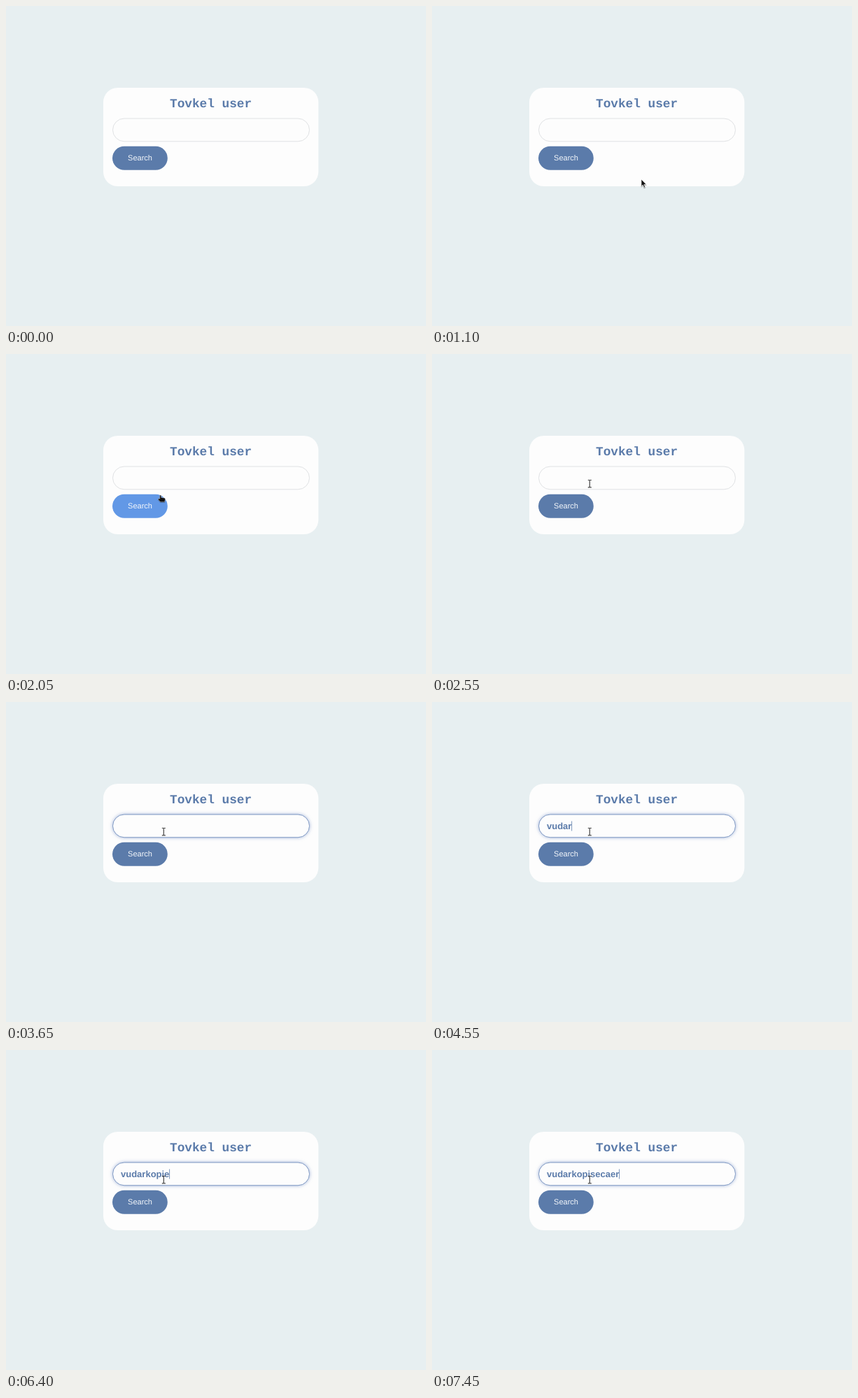
These frames come from a looping animation (600x458 px, 8 s). An HTML page:

```html
<!DOCTYPE html>
<html lang="en">
<head>
<meta charset="utf-8">
<title>User search</title>
<style>
  html, body { margin: 0; width: 100%; height: 100%; overflow: hidden; background: #e7eff1; }
  svg { display: block; width: 100%; height: 100%; }
  text { fill: #5b7baa; font-family: "Liberation Sans", Arial, sans-serif;
    font-kerning: none; text-rendering: geometricPrecision; }
  #title { font: bold 17.75px "Liberation Mono", monospace; text-anchor: middle; }
  #typed { font-size: 13px; font-weight: bold; }
  #label { font-size: 11px; fill: #f4f7fb; text-anchor: middle; }
  #field { fill: #fdfdfd; stroke: #e0e2e4; }
  #field.focus { stroke: #7d97c2; filter: drop-shadow(0 0 2.5px rgba(91, 123, 190, .55)); }
  #arrow, #hand { fill: #111; stroke: #fff; stroke-width: .7; stroke-linejoin: round;
    filter: drop-shadow(.5px 1px .7px rgba(0, 0, 0, .35)); }
  #hand { stroke-width: .4; }
  #ibeam { fill: none; stroke: #444; stroke-width: 1.2; }
</style>
</head>
<body>
<svg viewBox="0 0 600 458">
  <rect x="139" y="117" width="307.3" height="141" rx="20.5" fill="#fdfdfd"/>
  <text id="title" x="292.6" y="145.2">Tovkel user</text>
  <rect id="field" x="152.5" y="161" width="281" height="32.8" rx="16.4"/>
  <text id="typed" x="164" y="182"></text>
  <rect id="caret" y="170.5" width=".8" height="14" fill="#5b7baa"/>
  <rect id="button" x="152" y="200.8" width="78.8" height="34" rx="17"/>
  <text id="label" x="191.5" y="221.2">Search</text>
  <g id="cursor">
    <path id="arrow" d="M0 0V10.2L2.3 8.1 4 12 5.7 11.3 4 7.5H7.2Z"/>
    <path id="hand" d="M0 .6Q1-.7 2 .6V3.2L7 4.2Q8 4.6 7.8 6L7 9.8H1L-2.4 6.2Q-2.4 4.2 0 5.2Z"/>
    <path id="ibeam" d="M-2.5-5.2H-.8L0-4.7 .8-5.2H2.5M0-4.7V4.7M-2.5 5.2H-.8L0 4.7 .8 5.2H2.5"/>
  </g>
</svg>
<script>
const LOOP = 8000, STEP = 50, FOCUS = 2650, BLINK = 550;

// Where the pointer stops; it eases out between them
const stops = [
  { t: 850, x: 562, y: 257 },
  { t: 1100, x: 299, y: 248 },
  { t: 1650, x: 219.7, y: 202 },
  { t: 2050, x: 219.7, y: 202 },
  { t: 2500, x: 225.3, y: 185.7 }
];

// Bursts of evenly spaced keystrokes; "<" is backspace
const bursts = [
  { from: 4050, to: 4250, keys: 'vud' },
  { from: 4450, to: 4550, keys: 'ar' },
  { from: 5150, to: 5600, keys: 'kopi' },
  { from: 5800, to: 5850, keys: 'ec' },
  { from: 6400, to: 6500, keys: '<<' },
  { from: 6750, to: 7050, keys: 'sec' },
  { from: 7300, to: 7450, keys: 'aer' }
];

const $ = id => document.getElementById(id);
const show = (id, visible) => $(id).style.display = visible ? '' : 'none';
const clamp = v => Math.max(0, Math.min(1, v));
const easeOut = p => 1 - (1 - p) ** 2;

function pointerAt(t) {
  let { x, y } = stops[0];
  for (let i = 1; i < stops.length; i++) {
    const a = stops[i - 1], b = stops[i];
    const p = easeOut(clamp((t - a.t) / (b.t - a.t)));
    x += (b.x - a.x) * p;
    y += (b.y - a.y) * p;
  }
  return { x, y };
}

function textAt(t) {
  let text = '';
  for (const { from, to, keys } of bursts) {
    const gap = (to - from) / (keys.length - 1);
    [...keys].forEach((key, i) => {
      if (t >= from + i * gap) text = key === '<' ? text.slice(0, -1) : text + key;
    });
  }
  return text;
}

function drawPointer(t) {
  const { x, y } = pointerAt(t);
  const overField = x > 152 && x < 433 && y > 161 && y < 194;
  const overButton = x > 152 && x < 231 && y > 201 && y < 235;
  show('cursor', t >= stops[0].t);
  show('ibeam', overField);
  show('hand', overButton);
  show('arrow', !overField && !overButton);
  $('cursor').setAttribute('transform', `translate(${x} ${y})`);
}

function drawButton(t) {
  const hover = clamp((t - 1400) / 200) - clamp((t - 2100) / 200);
  const mix = (from, to) => Math.round(from + (to - from) * hover);
  $('button').setAttribute('fill', `rgb(${mix(91, 98)},${mix(123, 152)},${mix(170, 230)})`);
}

function drawField(t) {
  const text = textAt(t);
  const blinkOn = Math.floor((t - FOCUS) / BLINK) % 2 === 0;
  $('field').classList.toggle('focus', t >= FOCUS);
  $('typed').textContent = text;
  const width = text ? $('typed').getComputedTextLength() : 0;
  $('caret').setAttribute('x', 163.9 + width);
  show('caret', t >= FOCUS && (text || blinkOn));
}

const start = performance.now();
function frame() {
  const elapsed = (performance.now() - start) % LOOP;
  const t = Math.floor(elapsed / STEP) * STEP;
  drawPointer(t);
  drawButton(t);
  drawField(t);
  requestAnimationFrame(frame);
}
frame();
</script>
</body>
</html>
```
